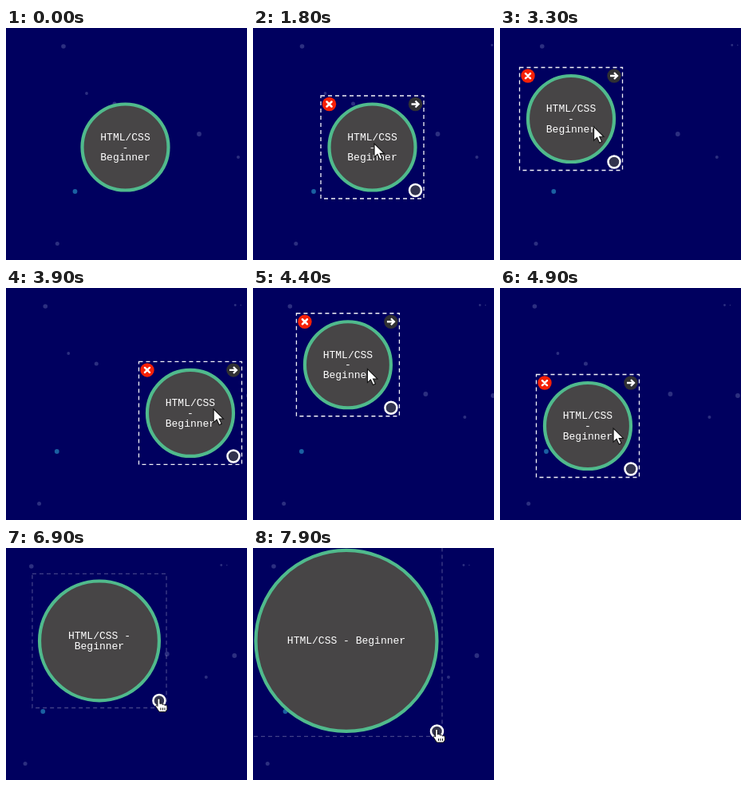
Write an HTML page that moves like this. It is 302x291 px and loops after 8 s.

```html
<!DOCTYPE html>
<html lang="en">
<head>
<meta charset="utf-8">
<title>Draggable course bubble</title>
<style>
  html, body { margin: 0; width: 100%; height: 100%; overflow: hidden; background: #00005f; }
  svg { display: block; width: 100vw; height: 100vh; }
  text { font: 13px "Liberation Mono", "Noto Sans Mono", monospace; fill: #fff; text-anchor: middle; }
</style>
</head>
<body>
<svg viewBox="0 0 302 291">
  <rect width="302" height="291" fill="#00005f"/>
  <g id="stars"></g>
  <circle id="disc" fill="#474546" stroke="#50ba8c" stroke-width="4.2"/>
  <g id="label"></g>
  <rect id="frame" fill="none" stroke="#fff" stroke-width="1.3" stroke-dasharray="5 4"/>
  <g id="close">
    <circle r="8.7" fill="#f62006"/>
    <path d="M-3-3 3 3M3-3-3 3" stroke="#fff" stroke-width="2.5" stroke-linecap="round"/>
  </g>
  <g id="link">
    <circle r="8.7" fill="#303033"/>
    <path d="M-5 0H3.5M0-4 4 0 0 4" fill="none" stroke="#fff" stroke-width="2.3"/>
  </g>
  <circle id="grip" r="7.5" fill="#33344f" stroke="#fff" stroke-width="2.5"/>
  <path id="arrow" d="M0 0V17L4 13.4 7 20 10 18.6 7.1 12.4H12.4Z" fill="#fff" stroke="#111" stroke-width="1.1"/>
  <g id="hand" stroke="#111" stroke-linejoin="round">
    <path d="M-2-1C-2-3 1-3 1-1V4C3 3 4 4 4 5 6 4 7 5 7 6 9 5 10 6 10 8V11L8 14H0L-4 8C-5 6-3 5-2 7Z" fill="#fff"/>
    <path d="M2 9V12M4.5 9V12M7 9V12" fill="none"/>
  </g>
</svg>
<script>
const LOOP = 8000, STEP = 100, DRIFT = 5.83 / 1000;
const $ = id => document.getElementById(id);

function set(el, attrs) {
  for (const k in attrs) el.setAttribute(k, attrs[k]);
  return el;
}
function add(parent, tag, attrs) {
  const el = document.createElementNS("http://www.w3.org/2000/svg", tag);
  return parent.appendChild(set(el, attrs));
}
const place = (el, [x, y]) => set(el, { transform: `translate(${x} ${y})` });
const show = (el, on) => set(el, { visibility: on ? "visible" : "hidden" });
const fade = (t, a, b) => Math.min(1, Math.max(0, (t - a) / (b - a)));
const smooth = (t, a, b) => { const u = fade(t, a, b); return u * u * (3 - 2 * u); };
const mix = (a, b, u) => a + (b - a) * u;
const mix2 = (p, q, u) => [mix(p[0], q[0], u), mix(p[1], q[1], u)];

// x, y, radius
const STARS = [
  [72, 23, 2.8], [101, 82, 1.9], [136, 95, 2.5], [242, 133, 2.9], [291, 162, 2],
  [64.3, 270.5, 2.5], [326.5, 135, 2.9], [310, 21.5, 1.4], [317, 21.5, 0.8], [86.5, 205, 2.9]
];
const stars = STARS.map(([, cy, r]) => add($("stars"), "circle", { cy, r, fill: "#2c2f80" }));
set(stars.at(-1), { fill: "#1a60a2" });

const HOME = [149.5, 149.5], HOLD = [29, 2];

// pulled aside, then swung around in a tightening spiral
function bubble(t) {
  const u = fade(t, 3300, 5700);
  const angle = (186 - 648 * u) * Math.PI / 180;
  const e = Math.sin(fade(u, 0.25, 0.667) * Math.PI / 2);
  const [cx, cy] = mix2([163, 122.8], [124.3, 145.7], e);
  const [rx, ry] = mix2([74.4, 84], [35.2, 29.9], e);
  const swing = [cx + rx * Math.cos(angle), cy + ry * Math.sin(angle)];
  return mix2(HOME, swing, smooth(t, 2400, 3300));
}

// comes in from the right, drags with a slight lead, then goes for the grip
function pointer(t, grip) {
  const [x, y] = bubble(t + 20);
  const held = [x + HOLD[0], y + HOLD[1]];
  const enter = mix2([312, 145], [152, 145], smooth(t, 1100, 1800));
  const drag = mix2(enter, held, smooth(t, 1900, 2300));
  return mix2(drag, grip, smooth(t, 5800, 6400));
}

const rows = [0, 1, 2].map(() => add($("label"), "text", {}));
function wrap(width) {
  const words = ["HTML/", "CSS", " -", " Beginner"];
  const lines = [""];
  for (const w of words) {
    const last = lines.length - 1;
    if ((lines[last] + w).length * 7.8 <= width) lines[last] += w;
    else lines.push(w.trim());
  }
  return lines;
}

function draw(t) {
  stars.forEach((s, i) => set(s, { cx: STARS[i][0] - DRIFT * t }));

  const grow = smooth(t, 6500, 7500);
  const [x, y] = bubble(t);
  const r = mix(54, 113.5, grow), half = mix(64.5, 120, grow);
  set($("disc"), { cx: x, cy: y, r });

  const lines = wrap(2 * r - 32);
  rows.forEach((row, i) => {
    row.textContent = lines[i] || "";
    set(row, { x, y: y + 4 + (i - (lines.length - 1) / 2) * 12.6 });
  });

  const shown = fade(t, 1400, 1650), busy = fade(t, 6450, 6700);
  set($("frame"), {
    x: x - half, y: y - half, width: 2 * half, height: 2 * half,
    opacity: shown * mix(0.95, 0.25, busy)
  });
  const grip = [x + r, y + r];
  place($("close"), [x - r, y - r]);
  place($("link"), [x + r, y - r]);
  place($("grip"), grip);
  for (const id of ["close", "link"]) set($(id), { opacity: shown * (1 - busy) });
  set($("grip"), { opacity: shown });

  const onGrip = t >= 6300, tip = pointer(t, grip);
  place($("arrow"), tip);
  place($("hand"), tip);
  show($("arrow"), t >= 1100 && !onGrip);
  show($("hand"), onGrip);
}

function tick() {
  draw(Math.floor(performance.now() % LOOP / STEP) * STEP);
  requestAnimationFrame(tick);
}
tick();
</script>
</body>
</html>
```
